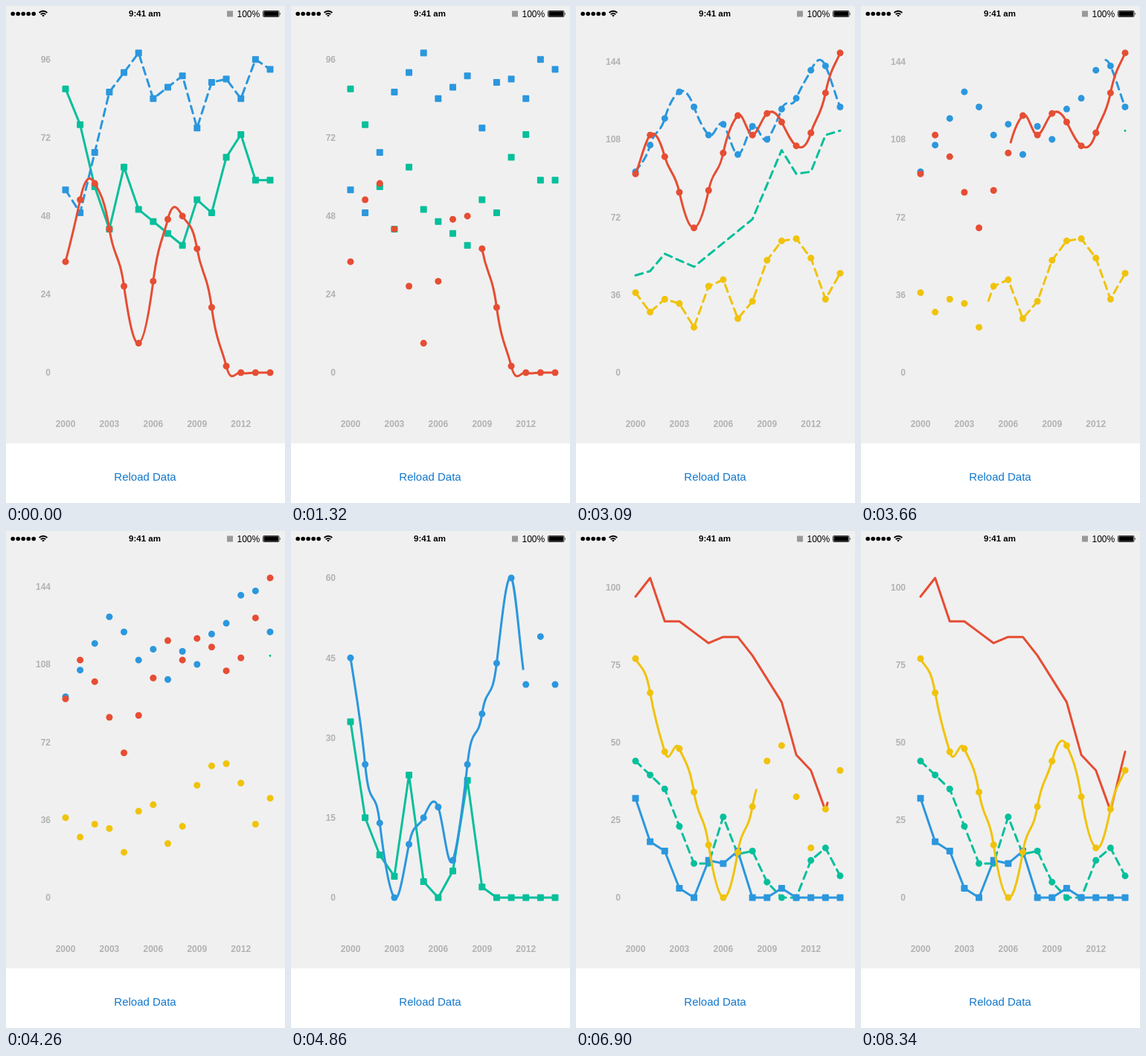
Write an HTML page that moves like this. It is 375 px wide and 667 px high and loops after 8.58 s.

```html
<!DOCTYPE html>
<html lang="en">
<head>
<meta charset="utf-8">
<title>Line chart</title>
<style>
  html, body { margin: 0; width: 100%; height: 100%; overflow: hidden; background: #fff; }
  svg { display: block; width: 375px; height: 667px; font-family: "Liberation Sans", Arial, sans-serif; }
  .axis text { font-size: 12px; font-weight: bold; fill: #b2b2b2; }
  .line { fill: none; stroke-width: 3; stroke-linecap: round; stroke-linejoin: round; }
</style>
</head>
<body>
<svg viewBox="0 0 375 667" xmlns="http://www.w3.org/2000/svg">
  <rect width="375" height="587" fill="#f0f0f0"/>
  <g id="signal"></g>
  <g fill="none" stroke="#000" stroke-width="1.8">
    <path d="M44.6 9A7.6 7.6 0 0 1 55.4 9"/>
    <path d="M46.7 11.3A4.7 4.7 0 0 1 53.3 11.3"/>
  </g>
  <path d="M48.2 12.7A2.6 2.6 0 0 1 51.8 12.7L50 14.6Z"/>
  <text x="186.5" y="14.3" font-size="11.5" font-weight="bold" text-anchor="middle">9:41 am</text>
  <rect x="297" y="6.5" width="8" height="8" fill="#999"/>
  <text x="310.5" y="14.5" font-size="12">100%</text>
  <rect x="345.5" y="6.5" width="21.5" height="8" rx="1.2" fill="none" stroke="#000" stroke-width=".8"/>
  <rect x="346.5" y="7.3" width="19.6" height="6.4" rx=".5"/>
  <path d="M368 8.8q1.6 1.7 0 3.4z"/>
  <g class="axis" id="years" text-anchor="middle"></g>
  <g id="charts"></g>
  <text x="187" y="637.2" font-size="15" text-anchor="middle" fill="#1277cc">Reload Data</text>
</svg>
<script>
const LOOP = 8580, PACE = 250, LAG = 18;
const YEARS = 15, BASE = 492, HEIGHT = 429, LEFT = 80, STEP = 19.643;
const DASH = 10, GAP = 7;
const GREEN = '#06bf9b', BLUE = '#2b97de', RED = '#e64d33', YELLOW = '#f0c30a';

const series = (color, marker, style, keys) => ({ color, marker, style, values: fill(keys) });

// Key points only: skipped years lie on a straight line, the last value holds.
function fill(keys) {
  const known = Object.keys(keys).map(Number);
  return Array.from({ length: YEARS }, (_, i) => {
    const a = known.findLast(k => k <= i);
    const b = known.find(k => k >= i) ?? a;
    return a === b ? keys[a] : keys[a] + (keys[b] - keys[a]) * (i - a) / (b - a);
  });
}

const first = [
  series(GREEN, 'square', '', [87, 76, 57, 44, 63, 50, , , 39, 53, 49, 66, 73, 59]),
  series(BLUE, 'square', 'dashed', [56, 49, , 86, , 98, 84, , 91, 75, 89, 90, 84, 96, 93]),
  series(RED, 'circle', 'smooth', [34, 53, 58, 44, , 9, , 47, 48, 38, , 2, 0])
];
const second = [
  series(GREEN, '', 'dashed', [45, 47, 55, , 49, , , , 71, , 103, 92, 93, 110, 112]),
  series(BLUE, 'circle', 'dashed smooth', [93, , , 130, 123, 110, 115, 101, 114, 108, 122, 127, 140, 142, 123]),
  series(RED, 'circle', 'smooth', [92, 110, 100, , 67, , , 119, 110, 120, 116, 105, 111, , 148]),
  series(YELLOW, 'circle', 'dashed', [37, 28, 34, 32, 21, 40, 43, 25, 33, 52, 61, 62, 53, 34, 46])
];
const third = [
  series(GREEN, 'square', '', [33, 15, 8, 4, 23, 3, 0, 5, 22, 2, 0]),
  series(BLUE, 'circle', 'smooth', [45, 25, 14, 0, 10, 15, 17, 7, 25, , 44, 60, 40, 49, 40])
];
const fourth = [
  series(GREEN, 'circle', 'dashed', [44, , 35, , 11, 11, 26, 14, 15, 5, 0, 0, 12, 16, 7]),
  series(BLUE, 'square', '', [32, 18, 15, 3, 0, 12, 11, 15, 0, 0, 3, 0]),
  series(RED, '', '', [97, 103, 89, 89, , 82, 84, 84, 78, , 63, 46, 41, 28, 47]),
  series(YELLOW, 'circle', 'smooth', [77, 66, 47, 48, 34, , 0, , , 44, 49, , 16, , 41])
];

const charts = [
  { lines: first, draw: -2000, erase: 842 },
  { lines: second, draw: 1750, erase: 3285 },
  { lines: third, draw: 4470, erase: 5647 },
  { lines: fourth, draw: 6320, erase: LOOP }
];

const byId = id => document.getElementById(id);

function add(parent, tag, attrs, text) {
  const el = document.createElementNS('http://www.w3.org/2000/svg', tag);
  for (const key in attrs) el.setAttribute(key, attrs[key]);
  if (text !== undefined) el.textContent = text;
  return parent.appendChild(el);
}

// cubic-bezier(.42, 0, .58, 1), solved by bisection
function easeInOut(x) {
  if (x <= 0) return 0;
  if (x >= 1) return 1;
  let lo = 0, hi = 1;
  for (let i = 0; i < 24; i++) {
    const s = (lo + hi) / 2, r = 1 - s;
    if (1.26 * s * r * r + 1.74 * s * s * r + s ** 3 < x) lo = s; else hi = s;
  }
  return lo * lo * (3 - 2 * lo);
}

function pathData(pts, smooth) {
  const y = i => pts[Math.max(0, Math.min(i, YEARS - 1))][1];
  const slope = i => (y(i + 1) - y(i - 1)) * .3;
  return pts.map((p, i) => {
    if (!i) return 'M' + p;
    if (!smooth) return 'L' + p;
    const [x0, y0] = pts[i - 1];
    return `C${x0 + STEP / 3},${y0 + slope(i - 1)} ${p[0] - STEP / 3},${p[1] - slope(i)} ${p}`;
  }).join('');
}

function addMarker(parent, shape, color, [x, y]) {
  if (shape === 'circle') add(parent, 'circle', { cx: x, cy: y, r: 4.5, fill: color });
  else add(parent, 'rect', { x: x - 4.5, y: y - 4.5, width: 9, height: 9, rx: 1, fill: color });
}

function build(chart) {
  const max = Math.max(...chart.lines.flatMap(l => l.values));
  const tick = Math.floor(max / 4 - max / 400);
  const toY = v => BASE - HEIGHT * v / max;
  chart.el = add(byId('charts'), 'g', {});
  const axis = add(chart.el, 'g', { class: 'axis', 'text-anchor': 'end' });
  for (let v = 0; v <= 4 * chartTick(max); v += chartTick(max)) {
    add(axis, 'text', { x: 60, y: toY(v) + 4.3 }, v);
  }
  for (const line of chart.lines) {
    const pts = line.values.map((v, i) => [LEFT + i * STEP, toY(v)]);
    line.path = add(chart.el, 'path', {
      class: 'line', stroke: line.color, d: pathData(pts, line.style.includes('smooth'))
    });
    line.length = line.path.getTotalLength();
    if (line.marker) pts.forEach(p => addMarker(chart.el, line.marker, line.color, p));
  }
}

// A quarter of the range, rounded down to a whole step.
function chartTick(max) {
  return Math.ceil(max / 4) - (max % 4 ? 1 : 0) - (max > 140 ? 1 : 0);
}

// Shows the part of a line between two fractions of its length.
function trim(line, from, to) {
  const total = line.length, size = Math.max((to - from) * total, .01);
  const dash = line.style.includes('dashed') ? DASH : total;
  const parts = [];
  for (let pos = 0; pos < size; pos += dash + GAP) {
    parts.push(Math.min(dash, size - pos), GAP);
  }
  parts[parts.length - 1] = total * 2;
  line.path.style.strokeDasharray = parts.join(' ');
  line.path.style.strokeDashoffset = -from * total;
}

function render(t) {
  charts.forEach((chart, i) => {
    const end = i + 1 < charts.length ? charts[i + 1].draw : LOOP;
    const on = t >= chart.draw && t < end;
    chart.el.style.visibility = on ? 'visible' : 'hidden';
    if (!on) return;
    // Every next line takes one more beat than the one before.
    chart.lines.forEach((line, n) => {
      const progress = start => easeInOut((t - start) / (PACE * (n + 1)));
      trim(line, progress(chart.erase), progress(chart.draw + LAG));
    });
  });
}

for (let i = 0; i < 5; i++) {
  add(byId('signal'), 'circle', { cx: 9.2 + i * 7, cy: 10.5, r: 2.8 });
  add(byId('years'), 'text', { x: LEFT + i * 3 * STEP, y: 565.3 }, 2000 + i * 3);
}
charts.forEach(build);

const start = performance.now();
function frame() {
  render((performance.now() - start) % LOOP);
  requestAnimationFrame(frame);
}
frame();
</script>
</body>
</html>
```
